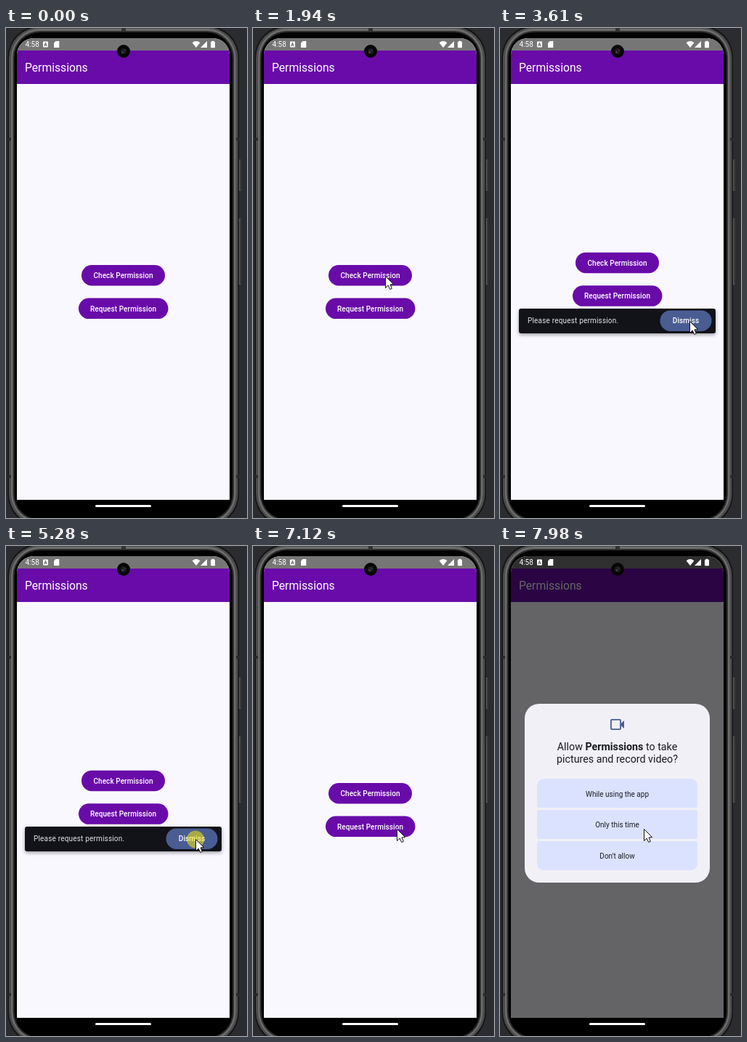
These frames come from a looping animation (332x674 px, 8000 ms). An HTML page with a canvas:

```html
<!DOCTYPE html>
<html lang="en">
<head>
<meta charset="utf-8">
<title>Permission demo</title>
<style>
  html, body { margin: 0; width: 100%; height: 100%; overflow: hidden; background: #2b2c2f; }
  canvas { display: block; width: 332px; height: 674px; }
</style>
</head>
<body>
<canvas id="stage" width="332" height="674"></canvas>
<script>
const LOOP = 8000;
const PURPLE = '#690ba9', BLUE = '#495d92', SURFACE = '#faf8ff';
const CENTER = 161.5;
const ctx = document.getElementById('stage').getContext('2d');

const clamp = v => Math.max(0, Math.min(1, v));
const between = (t, a, b) => t >= a && t < b;

function box(x, y, w, h, r, fill) {
  ctx.beginPath();
  ctx.roundRect(x, y, w, h, r);
  ctx.fillStyle = fill;
  ctx.fill();
}

function disc(x, y, r, fill) {
  ctx.beginPath();
  ctx.arc(x, y, r, 0, Math.PI * 2);
  ctx.fillStyle = fill;
  ctx.fill();
}

function poly(points, fill) {
  ctx.beginPath();
  points.forEach(([x, y]) => ctx.lineTo(x, y));
  ctx.closePath();
  ctx.fillStyle = fill;
  ctx.fill();
}

function text(str, x, y, { size = 10, weight = 400, color = '#fff', align = 'left', spacing = 0 } = {}) {
  ctx.font = `${weight} ${size}px Roboto, sans-serif`;
  ctx.letterSpacing = spacing + 'px';
  ctx.textAlign = align;
  ctx.fillStyle = color;
  ctx.fillText(str, x, y);
}

// Pointer moves: start, end, number of steps, destination, easing exponent
const POINTER_START = [230, 690];
const MOVES = [
  { a: 400, b: 1200, n: 13, to: [177, 428], ease: p => 1 - (1 - p) ** 1.5 },
  { a: 1280, b: 1730, n: 7, to: [182, 341], ease: p => p * p * (3 - 2 * p) },
  { a: 2670, b: 2800, n: 3, to: [195, 351], ease: p => p ** 1.5 },
  { a: 2870, b: 3080, n: 4, to: [254, 419], ease: p => 1 - (1 - p) ** 1.4 },
  { a: 3280, b: 3610, n: 6, to: [261, 403], ease: p => p * p * (3 - 2 * p) },
  { a: 5480, b: 5810, n: 6, to: [198, 389], ease: p => p * p * (3 - 2 * p) }
];
const CLICKS = [[1800, 1940], [5280, 5420], [6200, 6340]];

function pointerAt(t) {
  let pos = POINTER_START;
  for (const { a, b, n, to, ease } of MOVES) {
    if (t < a) break;
    const step = Math.min(n, Math.floor((t - a) / (b - a) * (n - 1) + 0.02) + 1);
    const p = ease(step / n);
    pos = pos.map((v, i) => v + (to[i] - v) * p);
  }
  return pos;
}

function drawPhone() {
  ctx.fillStyle = '#2b2c2f';
  ctx.fillRect(0, 0, 332, 674);

  // side keys
  for (const [y, h] of [[181, 43], [262, 91]]) {
    box(320, y, 4, h, 1.5, '#5c5c5c');
    box(322.5, y + 1, 1, h - 2, 0, '#1b1b1b');
  }

  box(2.5, -3, 318.5, 688, 43, '#151515');
  box(4, -1, 315.5, 684, 42, '#4c4c4c');
  box(7, 1, 309.5, 680, 40, '#6c6c6c');
  box(9.5, 4, 304.5, 674, 37, '#2d2d2d');
  box(11.5, 6, 300.5, 670, 35, '#000');

  // antenna bands
  for (const y of [151, 615]) {
    box(3, y, 4, 4, 0, '#2a2a2a');
    box(317, y, 4, 4, 0, '#2a2a2a');
  }
  box(159, 0, 6, 4, 0, '#333');
}

function drawButton(label, x, y, w, glow) {
  box(x, y, w, 28.5, 14.25, PURPLE);
  if (glow) {
    ctx.save();
    ctx.clip();
    glow();
    ctx.restore();
  }
  text(label, CENTER, y + 18, { weight: 500, align: 'center', spacing: 0.07 });
}

function drawApp(t) {
  ctx.fillStyle = SURFACE;
  ctx.fillRect(15, 14, 293, 635);
  ctx.fillStyle = '#767676';
  ctx.fillRect(15, 14, 293, 17);
  ctx.fillStyle = PURPLE;
  ctx.fillRect(15, 31, 293, 46);
  text('Permissions', 26, 59.5, { size: 15.7 });

  const snackOpen = between(t, 2260, 5560);
  const lift = snackOpen ? 17.3 : 0;

  const hover = between(t, 2260, 3080) ? 0.05 * clamp((3080 - t) / 280) : 0;
  drawButton('Check Permission', 104, 326 - lift, 115, hover && (() => {
    ctx.fillStyle = `rgba(255,255,255,${hover})`;
    ctx.fillRect(100, 300, 125, 60);
  }));

  const rippling = between(t, 6200, 6980);
  drawButton('Request Permission', 100, 371.6 - lift, 123.5, rippling && (() => {
    const grow = clamp((t - 6200) / 300);
    const fade = 0.1 * clamp((6980 - t) / 400);
    disc(198 - 36 * grow, 389 - 3 * grow, 20 + 42 * grow, `rgba(255,255,255,${fade})`);
  }));

  if (snackOpen) drawSnackbar(t);
}

function drawSnackbar(t) {
  ctx.save();
  if (t < 2330) ctx.globalAlpha = 0.6;
  else if (t > 5480) ctx.globalAlpha = 0.5;
  ctx.save();
  ctx.shadowColor = 'rgba(0,0,0,.38)';
  ctx.shadowBlur = 5;
  ctx.shadowOffsetY = 2;
  box(26, 386, 271, 34, 3, '#121318');
  ctx.restore();
  text('Please request permission.', 38, 406, { color: '#e2e2e9', spacing: 0.18 });
  box(220.5, 388.4, 71, 28.5, 14.25, BLUE);
  text('Dismiss', 256, 406.2, { weight: 500, align: 'center', spacing: 0.07 });
  ctx.restore();
}

function drawStatus() {
  text('4:58', 26.5, 26, { size: 10, weight: 400 });

  box(51, 18.5, 7, 8, 1, '#fff');
  text('A', 54.5, 25.2, { size: 6.5, weight: 700, align: 'center', color: '#555' });
  poly([[68.5, 18], [73.3, 18], [73.3, 27], [66, 27], [66, 20.5]], '#fff');

  ctx.beginPath();
  ctx.moveTo(262, 27);
  ctx.lineTo(256.6, 20.2);
  ctx.quadraticCurveTo(262, 15.8, 267.4, 20.2);
  ctx.closePath();
  ctx.fillStyle = '#fff';
  ctx.fill();
  poly([[277, 18], [277, 27], [268, 27]], '#fff');
  box(282, 18.8, 6, 8.4, 0.8, '#fff');
  box(283.5, 17.8, 3, 1.5, 0, '#fff');
}

function drawCamera() {
  disc(162, 32, 9, '#060606');
  disc(162, 32, 4, '#1c1c1c');
  disc(160.7, 33.2, 1.2, '#4a4a4a');
  disc(163.6, 30.8, 0.8, '#555');
}

function drawDialog() {
  const ink = '#1a1b21';
  box(34, 217, 255, 246, 20, '#f1f0f7');

  ctx.strokeStyle = BLUE;
  ctx.lineWidth = 1.8;
  ctx.beginPath();
  ctx.roundRect(152.9, 238.9, 13.2, 13.2, 1);
  ctx.stroke();
  poly([[166.5, 244.2], [171, 240], [171, 251], [166.5, 246.8]], BLUE);

  const title = { size: 14.27, color: ink };
  const parts = [['Allow ', 400], ['Permissions', 700], [' to take', 400]];
  const width = ([str, weight]) => {
    ctx.font = `${weight} ${title.size}px Roboto, sans-serif`;
    ctx.letterSpacing = '0px';
    return ctx.measureText(str).width;
  };
  let x = CENTER - parts.reduce((sum, part) => sum + width(part), 0) / 2;
  for (const part of parts) {
    text(part[0], x, 281, { ...title, weight: part[1] });
    x += width(part);
  }
  text('pictures and record video?', CENTER, 298, { ...title, align: 'center' });

  const corners = [[9, 9, 3, 3], [3, 3, 3, 3], [3, 3, 9, 9]];
  ['While using the app', 'Only this time', "Don't allow"].forEach((label, i) => {
    const y = 320.3 + i * 42.8;
    box(51, y, 221, 40, corners[i], '#dae2ff');
    text(label, CENTER, y + 24.2, { weight: 400, align: 'center', color: ink });
  });
}

function drawPointer(t) {
  const [x, y] = pointerAt(t);
  if (CLICKS.some(([a, b]) => between(t, a, b))) {
    disc(x, y + 0.5, 12, 'rgba(255,240,0,.52)');
  }
  ctx.save();
  ctx.translate(Math.round(x) + 0.5, Math.round(y) + 0.5);
  poly([[0, 0], [0, 16], [3.7, 12.6], [6.2, 18], [8.8, 16.9], [6.5, 11.4], [11.2, 11.2]], '#fff');
  ctx.strokeStyle = '#111';
  ctx.lineWidth = 1;
  ctx.lineJoin = 'round';
  ctx.stroke();
  ctx.restore();
}

function draw(t) {
  drawPhone();

  ctx.save();
  ctx.beginPath();
  ctx.roundRect(15, 14, 293, 657, 23);
  ctx.clip();
  drawApp(t);
  if (t >= 7650) {
    ctx.fillStyle = 'rgba(0,0,0,.6)';
    ctx.fillRect(15, 14, 293, 635);
  }
  ctx.restore();

  drawStatus();
  drawCamera();
  box(123, 656, 77, 3, 1.5, '#fff');

  if (t >= 7910) {
    ctx.globalAlpha = t < 7980 ? 0.6 : 1;
    drawDialog();
    ctx.globalAlpha = 1;
  }
  if (t >= 400) drawPointer(t);
}

const start = performance.now();
function tick() {
  draw((performance.now() - start) % LOOP);
  requestAnimationFrame(tick);
}
tick();
</script>
</body>
</html>
```
